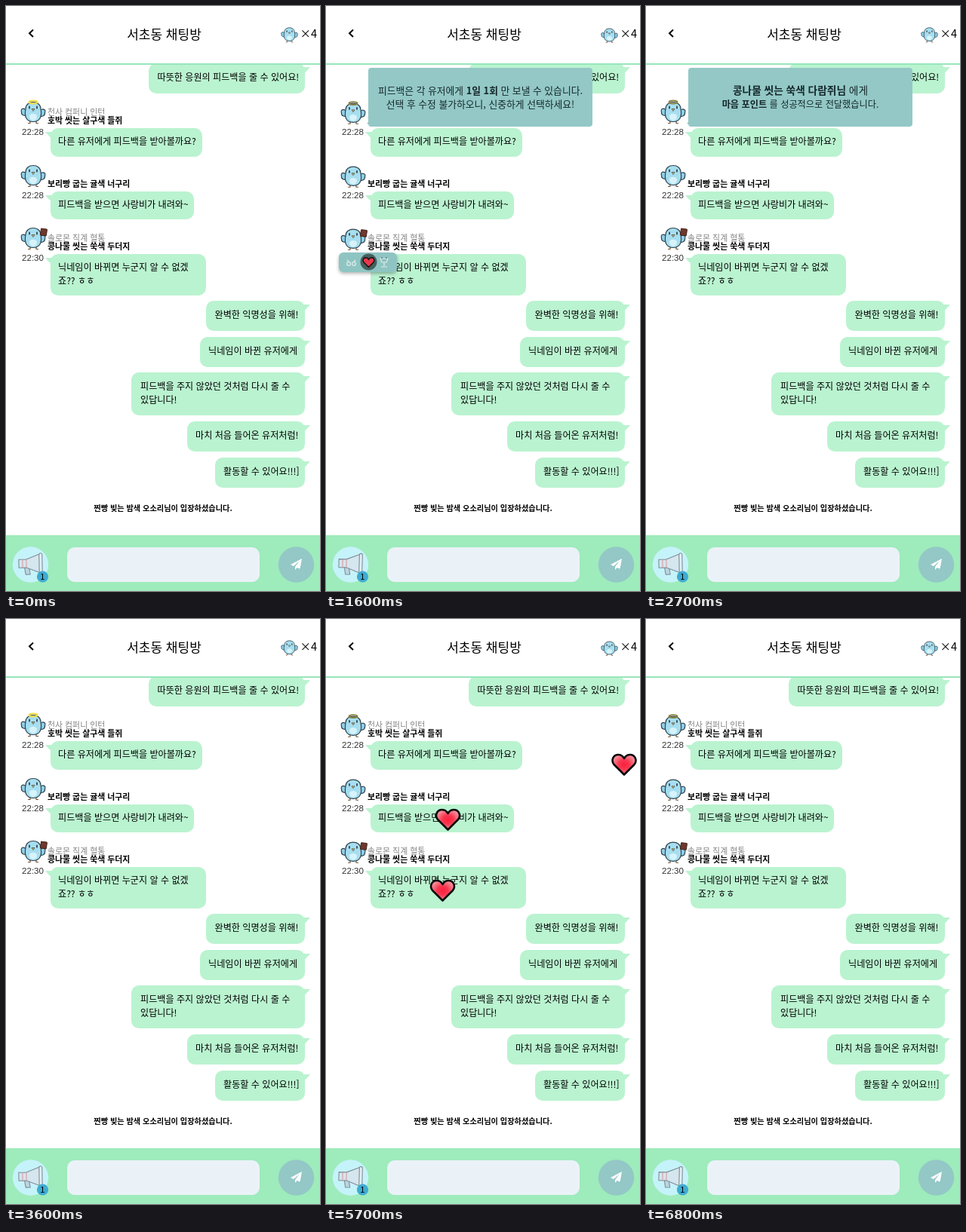
Recreate the animation shown at these times as an HTML page. Size 416x776 px, loop 6.9 s.

```html
<!DOCTYPE html>
<html lang="ko">
<head>
<meta charset="utf-8">
<title>채팅방</title>
<style>
html, body { margin: 0; width: 100%; height: 100%; overflow: hidden; background: #fff; }
svg { display: block; width: 416px; height: 776px; }
text { font-family: "Noto Sans CJK KR", "Noto Sans CJK", "Noto Sans KR", sans-serif; white-space: pre; }
.msg { font-size: 12.1px; font-weight: 500; }
.nick { font-size: 10.9px; font-weight: 700; }
.rank { font-size: 10.9px; fill: #858585; }
.time { font: 11.6px "Liberation Sans", Arial, sans-serif; fill: #333; }
.line { text-anchor: middle; font-size: 12.8px; font-weight: 500; fill: #16282b; }
.bold { font-weight: 700; }
</style>
</head>
<body>
<svg id="stage" viewBox="0 0 416 776">
  <defs>
    <radialGradient id="love">
      <stop offset="0" stop-color="#ff1f3d"/>
      <stop offset=".45" stop-color="#f7364f"/>
      <stop offset="1" stop-color="#f58a97"/>
    </radialGradient>
    <radialGradient id="shade">
      <stop offset="0" stop-color="#1d2b30" stop-opacity=".6"/>
      <stop offset=".55" stop-color="#1d2b30" stop-opacity=".3"/>
      <stop offset="1" stop-color="#1d2b30" stop-opacity="0"/>
    </radialGradient>
    <filter id="drop" x="-20%" y="-40%" width="140%" height="200%">
      <feDropShadow dx="0" dy="2" stdDeviation="2" flood-opacity=".3"/>
    </filter>
    <clipPath id="below"><rect y="78" width="416" height="698"/></clipPath>
    <path id="heart" d="M0 13.5 L-13.5 0 C-18 -6 -14 -13 -8 -13 C-4 -13 -1.5 -11 0 -8 C1.5 -11 4 -13 8 -13 C14 -13 18 -6 13.5 0 Z"/>
    <g id="bird" stroke="#33434d" stroke-width="1.2" stroke-linejoin="round">
      <path d="M-4 11 v4 h-3 M4 11 v4 h3" fill="none" stroke="#6e5537"/>
      <path d="M-8 -1 C-13 -7 -17 -4 -15.5 0 C-16 4 -12 6 -7 4 Z" fill="#8fd0ea"/>
      <path d="M8 -1 C13 -6 17 -3 15.5 1 C16 5 12 7 7 5 Z" fill="#8fd0ea"/>
      <path d="M-10 -4 C-10 -16 10 -16 10 -4 C12 6 9 13 0 13 C-9 13 -12 6 -10 -4 Z" fill="#a6def0"/>
      <path d="M-5 6 C-5 1 5 1 5 6 C5 13 -5 13 -5 6 Z" fill="#d8f3fa" stroke="none"/>
      <path d="M-2 -4 h4 l-2 3 Z" fill="#efb94b" stroke-width=".7"/>
      <path d="M-5 -7 v2 M5 -7 v2" stroke-width="1.8" stroke-linecap="round"/>
    </g>
  </defs>

  <g id="chat" clip-path="url(#below)"></g>
  <g id="avatars"></g>
  <circle id="ripple" cx="42" cy="308" fill="url(#shade)"/>

  <path d="M0 77 H416" stroke="#98e6bc" stroke-width="2"/>
  <path d="M36 31.5 L31 36.2 L36 41" fill="none" stroke="#000" stroke-width="2"/>
  <text x="209.5" y="44" text-anchor="middle" font-size="17" font-weight="500">서초동 채팅방</text>
  <text x="389.5" y="42" font-size="14.5" font-weight="500">×4</text>

  <rect y="702" width="416" height="74" fill="#9eebbc"/>
  <circle cx="32.5" cy="741" r="23.7" fill="#c5f3fa"/>
  <g id="horn" stroke="#7c8f9c" stroke-width="1.1" stroke-linejoin="round">
    <path d="M24 742 l2 12 h6 l-2 -12 Z" fill="#bfd3de"/>
    <path d="M17 734 h10 L45 727 v25 L27 745 h-10 Z" fill="#d6e6ee"/>
    <path d="M27 734 v11 M22 734 v11" fill="none" stroke="#d99a9f"/>
    <rect x="44" y="726" width="4" height="27" rx="2" fill="#e6eef2"/>
  </g>
  <circle cx="48.5" cy="757" r="7.6" fill="#3eabd2"/>
  <text x="48.3" y="760.5" text-anchor="middle" font-size="11">1</text>
  <rect x="81" y="718" width="255" height="46" rx="10" fill="#eaf2f7"/>
  <circle cx="384.5" cy="741" r="23.7" fill="#93c8c6"/>
  <path d="M392 733 L377 741 L381 743 L389 736 L383 744 V748 L385.5 745 L389.5 746.5 Z" fill="#fff"/>

  <g id="menu">
    <rect x="17" y="327" width="77" height="26" rx="6" fill="#8ec5c2" filter="url(#drop)"/>
    <g fill="none" stroke="#dfeceb" stroke-width="1.2">
      <circle cx="30" cy="342" r="2.4"/><circle cx="37" cy="342" r="2.4"/>
      <path d="M28 337 l2 2 M39 337 l-2 2"/>
      <path d="M72 335 h10 l-2 5 h-6 Z M77 340 v5 M73 346 h8"/>
      <path d="M74 335 v-2 M80 335 v-2" stroke="#596b70"/>
    </g>
    <circle cx="56.5" cy="339.5" r="11" fill="#45615f"/>
    <use href="#heart" transform="translate(56.5 340) scale(.48)" fill="#e8384b" stroke="#111" stroke-width="3"/>
  </g>

  <g id="hearts" clip-path="url(#below)"></g>
  <g id="toasts"></g>
</svg>
<script>
const LOOP = 6900, STEP = 100;
const $ = id => document.getElementById(id);
const clamp = v => Math.max(0, Math.min(1, v));
const ramp = (t, from, span) => clamp((t - from) / span);
const text = (cls, x, y, s) => `<text class="${cls}" x="${x}" y="${y}">${s}</text>`;

// x, y, width, height, text x, first text centre, lines
const bubbles = [
  [189, 76, 207, 40, 200.5, 95, '따뜻한 응원의 피드백을 줄 수 있어요!'],
  [59, 162, 201, 38, 69, 180, '다른 유저에게 피드백을 받아볼까요?'],
  [59, 246, 190, 37, 69, 264, '피드백을 받으면 사랑비가 내려와~'],
  [59, 329, 206, 55, 69, 347, '닉네임이 바뀌면 누군지 알 수 없겠', '죠?? ㅎㅎ'],
  [265, 391, 131, 40, 276.5, 410, '완벽한 익명성을 위해!'],
  [257, 439, 139, 40, 268, 458, '닉네임이 바뀐 유저에게'],
  [166, 486, 230, 57, 178, 505, '피드백을 주지 않았던 것처럼 다시 줄 수', '있답니다!'],
  [240, 551, 156, 40, 251, 570, '마치 처음 들어온 유저처럼!'],
  [277, 599, 119, 40, 288, 618, '활동할 수 있어요!!!]']
];

function bubble([x, y, w, h, tx, ty, ...lines]) {
  const right = x > 100, top = y + 5;
  const tail = right ? `M392 ${top} H403 L392 ${top + 12} Z` : `M52 ${top} H63 V${top + 12} Z`;
  return `<g fill="#baf3d0"><rect x="${x}" y="${y}" width="${w}" height="${h}" rx="10"/><path d="${tail}"/></g>` +
    lines.map((s, i) => text('msg', tx, ty + 4.4 + i * 17.3, s)).join('');
}

// avatar centre y, time, nickname, rank
const people = [
  [141, '22:28', '호박 씻는 살구색 들쥐', '천사 컴퍼니 인턴'],
  [225, '22:28', '보리빵 굽는 귤색 너구리', ''],
  [308, '22:30', '콩나물 씻는 쑥색 두더지', '솔로몬 직계 혈통']
];

$('chat').innerHTML = bubbles.map(bubble).join('') +
  people.map(([y, time, nick, rank]) =>
    text('time', 21, y + 30, time) + text('rank', 55, y + 3.5, rank) + text('nick', 55, y + 14.5, nick)).join('') +
  '<text class="nick" x="208" y="669.5" text-anchor="middle" style="font-size:10.2px">찐빵 빚는 밤색 오소리님이 입장하셨습니다.</text>';

const extras = [
  '<ellipse id="halo" cy="-13" rx="5.5" ry="2" fill="none" stroke-width="2"/>',
  '',
  '<rect x="10" y="-12" width="8" height="9" rx="1" fill="#70382c" stroke="#3f221c" transform="rotate(8 14 -8)"/>'
];
$('avatars').innerHTML =
  people.map(([y], i) => `<g class="pet" data-x="36" data-y="${y}" data-s="1"><use href="#bird"/>${extras[i]}</g>`).join('') +
  '<g class="pet" data-x="375.5" data-y="38" data-s=".68"><use href="#bird"/></g>';
const pets = [...document.querySelectorAll('.pet')];

// enter time, exit time, lines as [size, markup]
const toasts = [
  [675, 1700,
    [12.8, '피드백은 각 유저에게 <tspan class="bold">1일 1회</tspan> 만 보낼 수 있습니다.'],
    [12.8, '선택 후 수정 불가하오니, 신중하게 선택하세요!']],
  [1975, 3200,
    [13.7, '<tspan class="bold">콩나물 씻는 쑥색 다람쥐님</tspan> 에게'],
    [12.2, '<tspan class="bold">마음 포인트</tspan> 를 성공적으로 전달했습니다.']]
];
$('toasts').innerHTML = toasts.map(([, , ...lines]) =>
  '<g><rect x="56" y="82" width="297" height="78" rx="4" fill="#93c8c6"/>' +
  lines.map(([size, s], i) =>
    `<text class="line" x="204.5" y="${117 + i * 18}" style="font-size:${size}px">${s}</text>`).join('') +
  '</g>').join('');
const toastNodes = [...$('toasts').children];

// x, height at 5700 ms
const drops = [[395, 193], [161.5, 266], [154.5, 360]];
$('hearts').innerHTML = drops.map(() =>
  '<use href="#heart" fill="url(#love)" stroke="#0a0a0a" stroke-width="2.6" stroke-linejoin="round"/>').join('');
const heartNodes = [...$('hearts').children];

function draw(t) {
  const beat = t % 1200;
  const low = beat >= 400 && beat < 950;
  pets.forEach(p => {
    const { x, y, s } = p.dataset;
    const dy = low ? .7 : -.5;
    p.setAttribute('transform', `translate(${x} ${+y + dy * s}) scale(${s} ${s * (low ? .97 : 1)})`);
  });
  $('halo').setAttribute('stroke', beat < 100 || beat >= 1100 ? '#f3dc3c' : '#8a8244');
  $('horn').setAttribute('transform', `rotate(${low ? 1.5 : -1} 32 741)`);

  const press = ramp(t, 500, 550);
  $('ripple').setAttribute('r', press > 0 && press < 1 ? 16 + 20 * Math.sin(Math.PI * press) : 0);

  const open = ramp(t, 1000, 200);
  const shown = open * (1 - ramp(t, 2450, 200));
  $('menu').setAttribute('opacity', shown);
  $('menu').setAttribute('transform', `translate(55 ${340 - 20 * (1 - open)}) scale(${.4 + .6 * open}) translate(-55 -340)`);

  toasts.forEach(([enter, exit], i) => {
    const k = (1 - (1 - ramp(t, enter, 200)) ** 1.45) * (1 - ramp(t, exit, 200));
    toastNodes[i].setAttribute('opacity', k);
    toastNodes[i].setAttribute('transform', `translate(0 ${78 * (k - 1)})`);
  });

  drops.forEach(([x, at], i) => {
    const y = at + (t - 5700) * .5;
    heartNodes[i].setAttribute('transform', `translate(${x} ${y})`);
    heartNodes[i].setAttribute('visibility', y > 60 && y < 572 ? 'visible' : 'hidden');
  });
}

const start = performance.now();
function tick() {
  const t = (performance.now() - start) % LOOP;
  draw(Math.floor(t / STEP) * STEP);
  requestAnimationFrame(tick);
}
tick();
</script>
</body>
</html>
```
